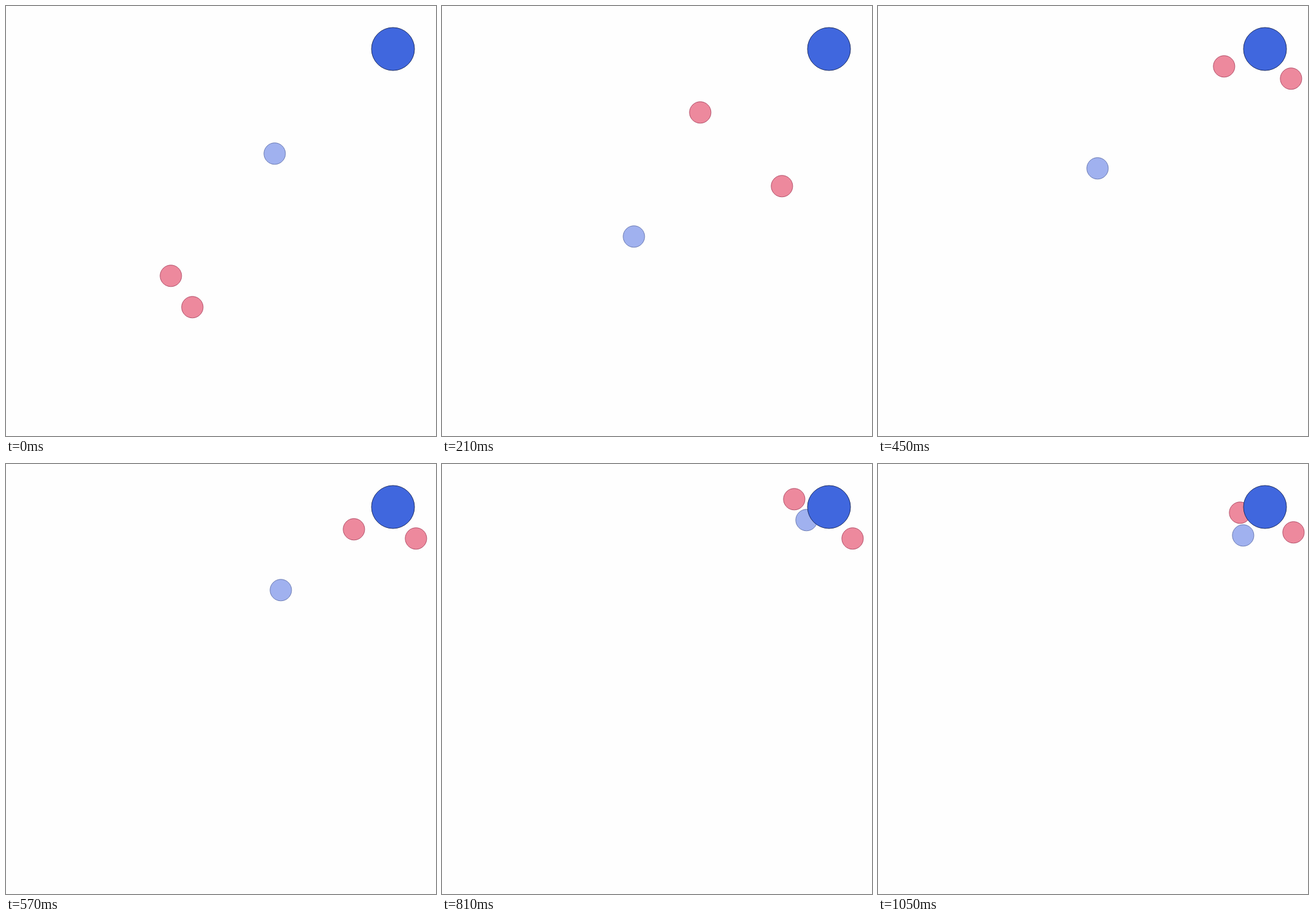
An HTML page for the animation above (1.08 s loop, 700 by 700 pixels).

```html
<!DOCTYPE html>
<html lang="en">
<head>
<meta charset="utf-8">
<title>Seekers</title>
<style>
  html, body { margin: 0; width: 100%; height: 100%; overflow: hidden; background: #fefefe; }
  svg { display: block; width: 100vw; height: 100vh; }
  .pink { fill: #ed899d; stroke: #b4506a; }
  .pale { fill: #a0b1ef; stroke: #6c7cb4; }
  .goal { fill: #4067de; stroke: #1e2f66; }
</style>
</head>
<body>
<svg viewBox="0 0 700 700">
  <circle class="seeker pink" r="17.5"/>
  <circle class="seeker pink" r="17.5"/>
  <circle class="seeker pale" r="17.5"/>
  <circle class="goal" cx="630" cy="70" r="35"/>
</svg>
<script>
const STEP = 30, STEPS = 36;

// Each seeker glides through its key points, reached at these steps
const times = [0, 7, 11, 15, 19, 27, 35];
const paths = [
  [[268, 439], [420, 173], [581, 88], [563, 98], [566, 106], [573, 57], [589, 79]],
  [[303, 490], [553, 293], [629, 128], [672, 118], [667, 121], [668, 121], [676, 111]],
  [[437, 240], [312, 375], [301, 334], [357, 264], [447, 205], [593, 91], [594, 116]]
];
const last = times.length - 1;

const rate = (p, i, axis) => (p[i + 1][axis] - p[i][axis]) / (times[i + 1] - times[i]);

// Velocity at a key point: the curve eases between its neighbours, with a free start
function slope(p, i, axis) {
  if (i === 0) return 1.5 * rate(p, 0, axis) - 0.5 * slope(p, 1, axis);
  if (i === last) return rate(p, last - 1, axis);
  const before = times[i] - times[i - 1], after = times[i + 1] - times[i];
  return (rate(p, i - 1, axis) * after + rate(p, i, axis) * before) / (before + after);
}

function place(p, n, axis) {
  const i = times.findLastIndex((t, k) => k < last && t <= n);
  const span = times[i + 1] - times[i], s = (n - times[i]) / span, r = 1 - s;
  return p[i][axis] * r * r * (1 + 2 * s) + p[i + 1][axis] * s * s * (3 - 2 * s)
    + span * s * r * (slope(p, i, axis) * r - slope(p, i + 1, axis) * s);
}

const seekers = document.querySelectorAll('.seeker');
const start = performance.now();

function draw() {
  const n = Math.floor((performance.now() - start) / STEP) % STEPS;
  seekers.forEach((dot, k) => {
    dot.setAttribute('cx', place(paths[k], n, 0) + 0.4);
    dot.setAttribute('cy', place(paths[k], n, 1) + 0.3);
  });
  requestAnimationFrame(draw);
}
draw();
</script>
</body>
</html>
```
